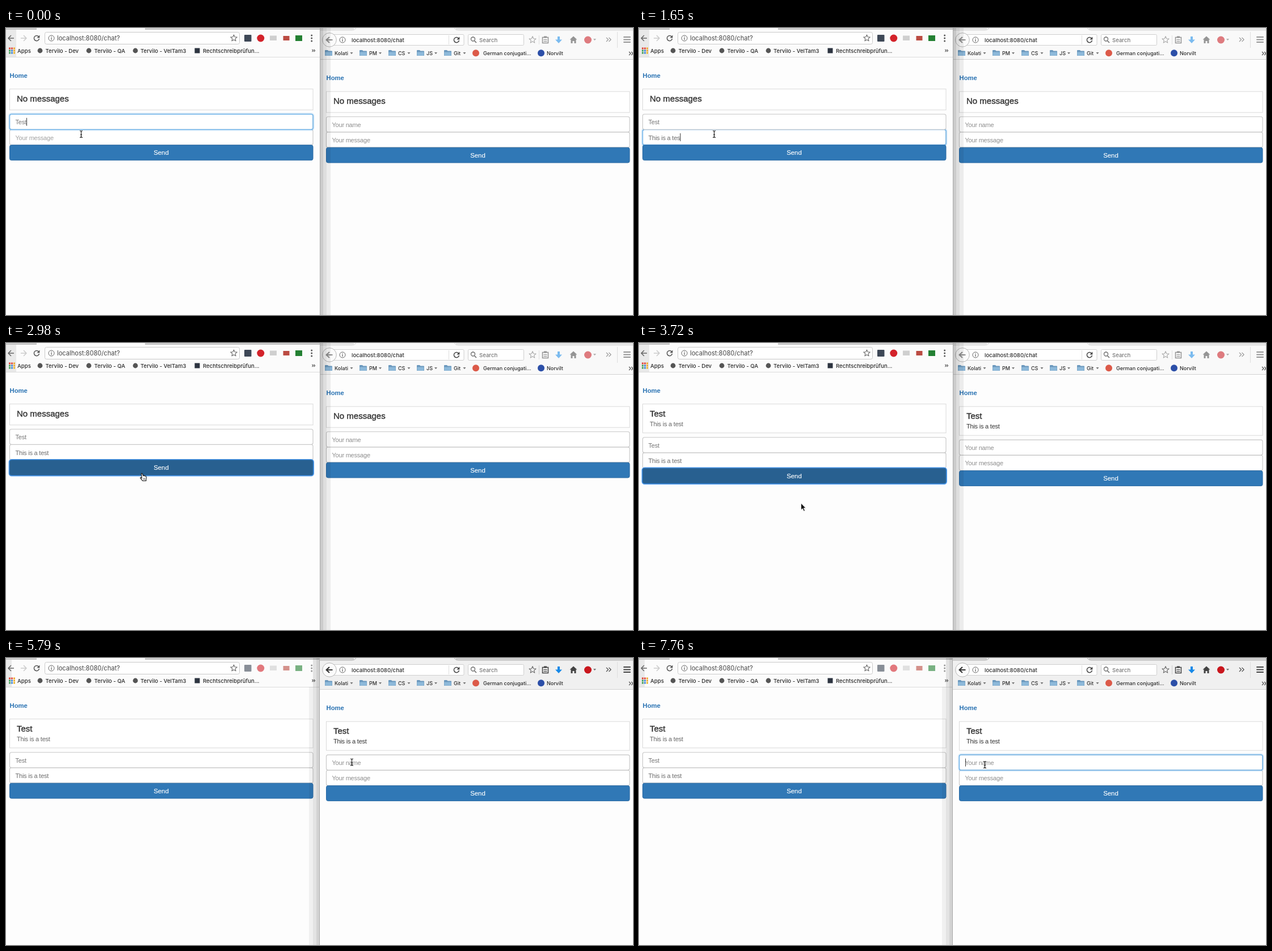
An HTML page that plays this animation: 1105 by 507 pixels, repeating every 8 s.

```html
<!DOCTYPE html>
<html lang="en">
<head>
<meta charset="utf-8">
<title>Chat in two browsers</title>
<style>
html, body { margin: 0; width: 100%; height: 100%; overflow: hidden; background: #fdfdfd; }
svg { display: block; width: 100%; height: 100%; }
text { white-space: pre; }
.ui { font-family: Inter, Roboto, sans-serif; font-size: 9.6px; font-weight: 500; fill: #2b2b2b; }
.small { font-size: 9px; }
.url { font-size: 11.1px; font-weight: 400; fill: #444; }
.page text { font-family: "Liberation Sans", Arial, sans-serif; font-size: 11px; letter-spacing: -.22px; }
.page .home { font-size: 11.3px; font-weight: bold; fill: #2a73b3; letter-spacing: 0; }
.page .head { font-size: 15px; fill: #333; stroke: #333; stroke-width: .4; letter-spacing: 0; }
.page .send { font-size: 11.4px; fill: #fff; stroke: #fff; stroke-width: .15; letter-spacing: 0; text-anchor: middle; }
.line { fill: none; stroke-width: 1.5; stroke-linejoin: round; }
</style>
</head>
<body>
<svg id="stage" viewBox="0 0 1105 507"></svg>
<script>
const LOOP = 8000;
const stage = document.getElementById('stage');

// ---- markup helpers ----
const box = (x, y, w, h, fill, more = '') => `<rect x="${x}" y="${y}" width="${w}" height="${h}" fill="${fill}" ${more}/>`;
const dot = (x, y, r, fill, more = '') => `<circle cx="${x}" cy="${y}" r="${r}" fill="${fill}" ${more}/>`;
const line = (d, stroke, more = '') => `<path class="line" d="${d}" stroke="${stroke}" ${more}/>`;
const label = (x, y, s, cls, more = '') => `<text x="${x}" y="${y}" class="${cls}" ${more}>${s}</text>`;
const group = (id, body, more = '') => `<g id="${id}" ${more}>${body}</g>`;

const star = (cx, cy, r) => {
  let d = '';
  for (let i = 0; i < 10; i++) {
    const a = i * Math.PI / 5 - Math.PI / 2, q = i % 2 ? r * .45 : r;
    d += (i ? 'L' : 'M') + (cx + q * Math.cos(a)).toFixed(1) + ' ' + (cy + q * Math.sin(a)).toFixed(1);
  }
  return line(d + 'Z', '#666', 'stroke-width="1" style="stroke-width:1.1"');
};
const info = (x, y) => dot(x, y, 5, 'none', 'stroke="#666"') + box(x - .6, y - 1, 1.2, 4, '#666') + box(x - .6, y - 3, 1.2, 1.2, '#666');
const reload = (x, y, c) => line(`M${x + 3.4} ${y - 3}A4.6 4.6 0 1 0 ${x + 4.5} ${y + 1}`, c) +
  `<path d="M${x + 5.4} ${y - 5.6}v5h-5z" fill="${c}"/>`;
const arrowLeft = (x, y, c, w = 5) => line(`M${x + w} ${y}H${x - w}M${x} ${y - 5}L${x - w} ${y}L${x} ${y + 5}`, c);
const folder = x => `<path d="M${x} 40q0-1 1-1h4l1.5 1.5H${x + 12}q1 0 1 1V49H${x}Z" fill="#6b98bd"/>` +
  box(x + .5, 42.5, 12, 6.3, '#8db9da');
const chevron = (x, y, c = '#777') => `<path d="M${x - 2.5} ${y - 1.5}h5l-2.5 3.2z" fill="${c}"/>`;
const more = (x, y, c = '#555', s = 3) => line(`M${x - s} ${y - s}l${s} ${s}l${-s} ${s}M${x + 1} ${y - s}l${s} ${s}l${-s} ${s}`, c, 'style="stroke-width:1.2"');

// ---- left browser ----
function leftBar() {
  const grid = ['#e2483d', '#e2483d', '#f0a92e', '#4aa35a', '#4285d8', '#f0a92e', '#4aa35a', '#4285d8', '#e8b52c'];
  const marks = [[60, 69.5, 'Tervilo - Dev'], [146, 155.5, 'Tervilo - QA'], [228, 237, 'Tervilo - VelTam3']];
  return box(0, 0, 553, 51, '#fbfbfb') + box(0, 0, 54, 2.5, '#d0d0d0') + box(245, 0, 308, 2.5, '#d0d0d0') +
    box(0, 2, 54, 1, '#b8b8b8') + box(245, 2, 308, 1, '#b8b8b8') +
    '<rect id="edge" x="0" y="3" width="18" height="48" fill="#e9e9e9"/>' + box(0, 51, 553, 1, '#dcdcdc') +
    arrowLeft(9, 18, '#666') + line('M26 18H36M31 13L36 18L31 23', '#ccc') + reload(54, 18, '#555') +
    box(68.5, 7.5, 343, 21, '#fff', 'rx="3" stroke="#c9c9c9"') + info(80, 18) +
    label(90, 22, 'localhost:8080/chat?', 'ui url') + star(401.5, 18, 6) +
    group('addons', box(420, 12, 12.5, 12, '#3d4756', 'rx="1"') + dot(448.8, 18, 6.5, '#d3222a') +
      box(465, 13.5, 12, 8.5, '#cfcfcf') + box(488.5, 14, 11, 8, '#bb4b42') + box(510, 13, 12, 10, '#238032') +
      [13, 18, 23].map(y => dot(538.7, y, 1.5, '#555')).join('')) +
    grid.map((c, i) => box(5 + i % 3 * 4, 34.5 + (i / 3 | 0) * 4, 3, 3, c)).join('') + label(20, 43.5, 'Apps', 'ui') +
    marks.map(([c, x, s]) => dot(c, 40, 4.4, '#555') + label(x, 43.5, s, 'ui')).join('') +
    box(332.5, 35.5, 9, 9, '#2d3440') + label(347, 43.5, 'Rechtschreibprüfun...', 'ui') + more(541.5, 40, '#555', 2);
}

// ---- right browser ----
function rightBar() {
  const dirs = [[562, 579, 609, 'Kolati'], [623, 640, 659.5, 'PM'], [674, 691, 710, 'CS'], [724, 741, 757.5, 'JS'], [772, 789, 808, 'Git']];
  return '<rect id="barR" x="553" y="0" width="552" height="55" fill="#f9f9f9"/>' +
    group('tabsR', box(553, 0, 60, 3.5, '#d0d0d0') + box(793, 0, 312, 3.5, '#d0d0d0') +
      line('M553 4H610Q615 4 617 0M790 0Q792 4 797 4H1105', '#b0b0b0', 'style="stroke-width:1"')) +
    box(553, 55, 552, 1, '#d2d2d2') + box(570, 11.5, 237, 19, '#fff', 'stroke="#cfcfcf" rx="2"') +
    dot(570, 21, 12.3, '#fbfbfb', 'stroke="#b5b5b5"') + group('backR', arrowLeft(570, 21, '#333', 5.5).replace('/>', ' style="stroke-width:2.2"/>')) +
    info(593, 21) + label(609, 24.6, 'localhost:8080/chat', 'ui', 'font-weight="400"') +
    box(780, 13, 1, 16, '#ddd') + reload(794, 21, '#444') +
    box(814.5, 11.5, 98, 19, '#fff', 'stroke="#cfcfcf" rx="2"') + dot(823, 19.5, 3.5, 'none', 'stroke="#666" stroke-width="1.3"') +
    line('M825.5 22.5L829 26', '#666') + label(834, 24.6, 'Search', 'ui', 'style="fill:#777"') +
    group('toolsR', star(928, 21, 6.3) + box(939, 13, 1, 16, '#ccc') +
      box(945.5, 16.5, 10, 10, 'none', 'stroke="#444" stroke-width="1.5"') + box(948, 14.5, 5, 3, '#444') +
      [20, 23].map(y => box(947.5, y, 6, 1.2, '#444')).join('') +
      '<path d="M972 15h4v5.5h4L974 27l-6-6.5h4z" fill="#1689e8"/>' +
      '<path d="M1000 14.5l6.5 6h-2V27h-3v-4h-3v4h-3v-6.5h-2z" fill="#444"/>' +
      dot(1025.5, 21, 6.5, '#c9161d') + chevron(1037.5, 20.5) + more(1061.5, 20.5, '#444', 3.6) +
      [16, 20.5, 25].map(y => box(1088, y - 1, 13, 2, '#444', 'rx="1"')).join('')) +
    box(1077, 7, 1, 28, '#dedede') +
    dirs.map(([f, x, c, s]) => folder(f) + label(x, 47.8, s, 'ui small') + chevron(c, 44.5)).join('') +
    dot(828, 44.3, 6, '#dc5a49') + label(841, 47.8, 'German conjugati...', 'ui small') +
    dot(943, 44.3, 6, '#2c4fa8') + label(953, 47.8, 'Norvilt', 'ui small') + more(1101, 45, '#555', 3);
}

// ---- the chat page, the same in both browsers ----
function field(id, y) {
  return box(6.5, y, 534.5, 27, '#fff', 'rx="3" stroke="#c6c6c6" stroke-width="1.1"') +
    group(id + 'Focus', box(5.5, y - 1, 536.5, 29, 'none', 'rx="4" stroke="#66afe9" stroke-opacity=".25" stroke-width="3"') +
      box(6.5, y, 534.5, 27, 'none', 'rx="3" stroke="#66afe9" stroke-width="1.3"')) +
    label(16.5, y + 18, '', '', `id="${id}Text"`) + box(17, y + 6.5, 1, 14, '#333', `id="${id}Caret"`);
}
function page(p, x, y, dark) {
  return `<g class="page" transform="translate(${x} ${y})">` + label(6.5, 87.6, 'Home', 'home') +
    `<rect id="${p}Panel" x="6.5" y="107.8" width="534.5" height="37" fill="#fff" stroke="#dadada"/>` +
    label(19, 129.7, '', 'head', `id="${p}Head"`) + label(19, 147, '', '', `id="${p}Body" fill="${dark}"`) +
    group(p + 'Form', field(p + 'Msg', 179.5) + field(p + 'Name', 152.3) +
      `<rect id="${p}Ring" x="5.8" y="206.2" width="536" height="28.2" rx="4" fill="none" stroke="#4f9cf0" stroke-width="2.4"/>` +
      `<rect id="${p}Send" x="6.5" y="206.8" width="534.5" height="26.8" rx="3" fill="#3078b6" stroke="#2a6aa4"/>` +
      label(273.5, 224.2, 'Send', 'send')) + '</g>';
}

const shade = (x, w, a, y = 0) => box(x, y, w, 507 - y, '#000', `fill-opacity="${a}"`);
const cursors =
  group('ibeam', line('M-2.5 -6Q0 -6 0 -4V4Q0 6 -2.5 6M2.5 -6Q0 -6 0 -4V4Q0 6 2.5 6M-1.5 1H1.5', '#222', 'style="stroke-width:1.2"')) +
  group('arrow', '<path d="M0 0V12L2.8 9.4L5 14.2L7 13.3L4.9 8.7H8.6Z" fill="#111" stroke="#fff" stroke-width=".8"/>') +
  group('hand', '<path d="M-3.5 -6.3q1.4-1 2 .6l1.3 3.2q1-.8 1.8.2q1-.6 1.8.4q1.5-.3 1.7 1.4q.6 3-.3 4.2v2.8H-1.2L-5.2 1.6q-.6-1.5 1.4-.9l1.1 1Z" fill="#fff" stroke="#111" stroke-width="1.1"/>' +
    line('M.6 2V4.6M2.4 2V4.6', '#111', 'style="stroke-width:.8"'));

stage.innerHTML = box(0, 0, 1105, 507, '#fdfdfd') + leftBar() + page('l', 0, 0, '#666') +
  rightBar() + page('r', 558, 4.4, '#333') +
  group('shadeR', shade(553, 6, .2) + shade(559, 6, .12) + shade(565, 7, .065) + box(553, 0, 1, 507, '#a8a8a8')) +
  group('shadeL', shade(534, 7, .05, 51) + shade(541, 6, .1) + shade(547, 5, .17) + box(552, 0, 1, 507, '#a8a8a8')) + cursors;

const el = {};
stage.querySelectorAll('[id]').forEach(e => el[e.id] = e);

// ---- timeline: [start, value...] ----
const TYPED = [[0, 0], [620, 1], [767, 3], [914, 4], [1061, 6], [1209, 8], [1356, 10], [1503, 11], [1650, 13], [1800, 14]];
const NAME_FOCUS = [[0, 1], [150, .5], [320, 0]];
const MSG_FOCUS = [[0, 0], [150, .5], [320, 1], [2830, 0]];
const RIGHT_FOCUS = [[0, 0], [6680, .5], [6860, 1]];
const RIGHT_CARET = [[0, 0], [6680, 1], [7310, 0], [7760, 1]];
const MOUSE = [
  [0, 'ibeam', 132.5, 187.5], [1948, 'ibeam', 142, 190], [2096, 'ibeam', 168, 199], [2244, 'hand', 208, 216],
  [2392, 'hand', 234, 230], [2540, 'hand', 242, 237], [3430, 'hand', 247, 243], [3576, 'arrow', 262, 259],
  [3720, 'arrow', 285.5, 283], [3867, 'arrow', 350, 314], [4013, 'arrow', 462, 317], [4159, 'arrow', 585, 302],
  [4304, 'arrow', 672, 235], [4450, 'arrow', 640, 165], [4600, 'arrow', 614, 140], [4750, 'arrow', 597, 148],
  [4900, 'arrow', 608.5, 158], [5500, 'arrow', 609, 168], [5647, 'ibeam', 609.5, 184], [5793, 'ibeam', 609.5, 188.5]
];
const TEXT = 'This is a test';

const at = (steps, t) => steps.reduce((a, s) => s[0] <= t ? s : a);
const set = (id, key, v) => el[id].setAttribute(key, v);
const show = (id, on) => set(id, 'opacity', +on);
const write = (id, s, color) => {
  if (el[id].textContent !== s) el[id].textContent = s;
  if (color) set(id, 'fill', color);
};

function messages(p, sent) {
  set(p + 'Panel', 'height', sent ? 51 : 37);
  set(p + 'Form', 'transform', `translate(0 ${sent ? 14.4 : 0})`);
  write(p + 'Head', sent ? 'Test' : 'No messages');
  write(p + 'Body', sent ? TEXT : '');
}

function draw(t) {
  const sent = t >= 3130, right = t >= 5647;
  const typed = at(TYPED, t)[1], msgFocus = at(MSG_FOCUS, t)[1];
  messages('l', sent);
  messages('r', sent);

  write('lNameText', 'Test', '#777');
  write('lMsgText', typed ? TEXT.slice(0, typed) : 'Your message', typed ? '#6d6d6d' : '#a2a2a2');
  write('rNameText', 'Your name', '#8e8e8e');
  write('rMsgText', 'Your message', '#8e8e8e');
  show('lNameFocus', at(NAME_FOCUS, t)[1]);
  show('lMsgFocus', msgFocus);
  show('rNameFocus', at(RIGHT_FOCUS, t)[1]);
  show('rMsgFocus', 0);

  show('lNameCaret', t < 150);
  set('lNameCaret', 'x', 36);
  show('lMsgCaret', msgFocus > 0);
  set('lMsgCaret', 'x', typed ? 16.5 + el.lMsgText.getComputedTextLength() : 16.5);
  show('rNameCaret', at(RIGHT_CARET, t)[1]);
  show('rMsgCaret', 0);

  const pressed = t >= 2830 && !right;
  set('lSend', 'fill', (t >= 2244 && !right) ? '#286090' : '#3078b6');
  show('lRing', pressed);
  show('rRing', 0);

  show('shadeR', !right);
  show('shadeL', right);
  set('edge', 'width', right ? 10 : 18);
  set('addons', 'opacity', right ? .6 : 1);
  set('toolsR', 'opacity', right ? 1 : .55);
  set('backR', 'opacity', right ? 1 : .55);
  set('tabsR', 'opacity', right ? 1 : .45);
  set('barR', 'fill', right ? '#f0f0f0' : '#f9f9f9');

  const [, kind, x, y] = at(MOUSE, t);
  for (const k of ['ibeam', 'arrow', 'hand']) show(k, k === kind);
  set(kind, 'transform', `translate(${x} ${y})`);
}

const start = performance.now();
function tick() {
  draw((performance.now() - start) % LOOP);
  requestAnimationFrame(tick);
}
tick();
</script>
</body>
</html>
```
